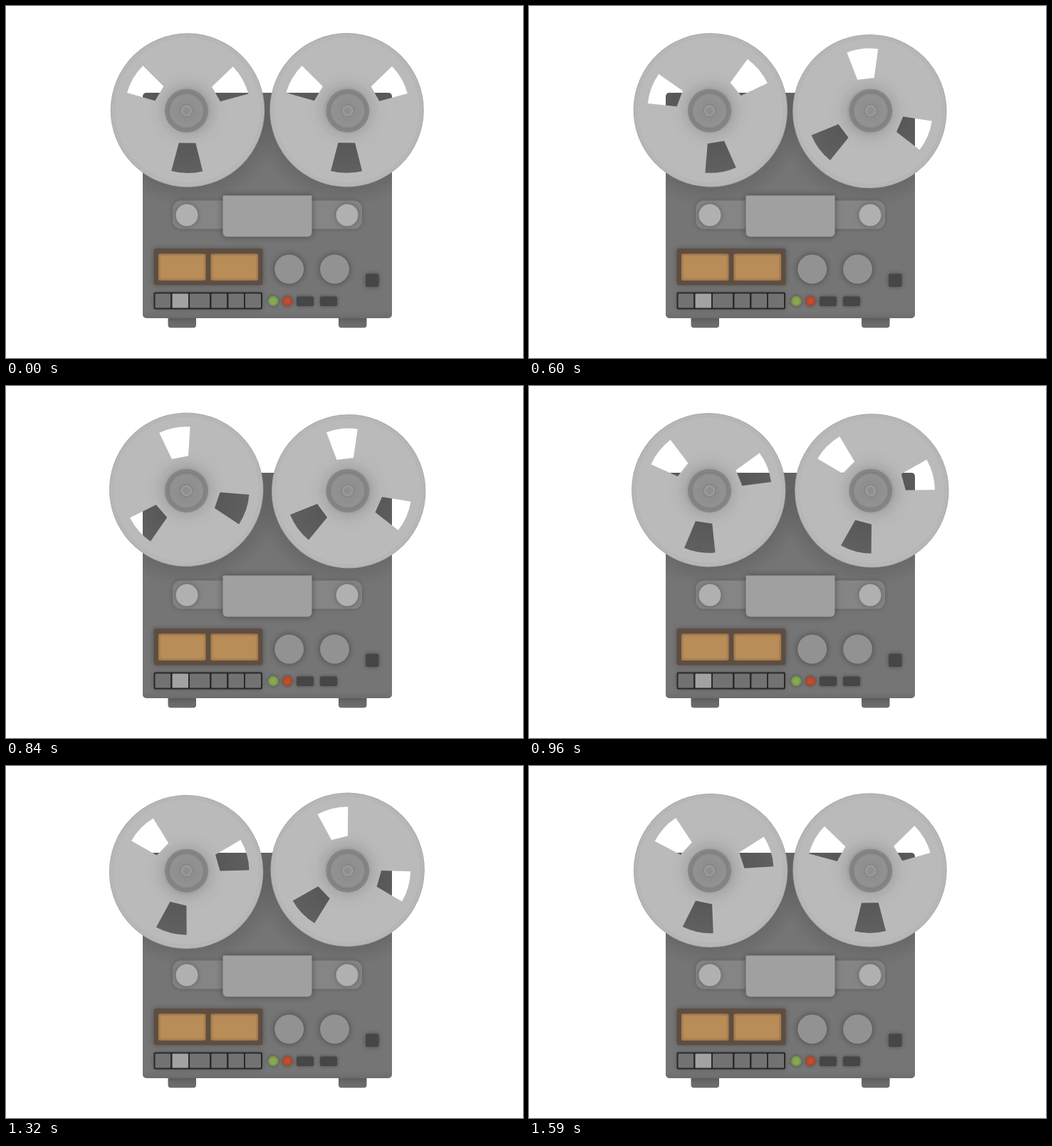
An HTML page with a canvas for the animation above (1.62 s loop, 726 px wide and 495 px high).

```html
<!DOCTYPE html>
<html lang="en">
<head>
<meta charset="utf-8">
<title>Tape recorder</title>
<style>
html, body { margin: 0; width: 100%; height: 100%; overflow: hidden; background: #fff; }
canvas { display: block; }
</style>
</head>
<body>
<canvas id="stage" width="726" height="495"></canvas>
<script>
const W = 726, H = 495, LOOP = 1620, STEP = 30;
const TAU = Math.PI * 2, RAD = Math.PI / 180;
const canvas = document.getElementById('stage');
const ctx = canvas.getContext('2d');

// Keys are [ms, degrees turned counter-clockwise].
const reels = [
  { x: 253.5, y: 147.3, wobble: 1.65, phase: -28, base: 90.5,
    keys: [[0, 0], [490, 0], [720, 33.3], [840, 71.5], [1080, 152.5], [1320, 226.5], [1590, 348.5]] },
  { x: 479.8, y: 147.3, wobble: 1.6, phase: 218, base: 90.3,
    keys: [[0, 0], [375, 0], [420, 2.8], [720, 127.2], [840, 186.5], [1080, 257.8], [1320, 314.3], [1590, 360.7]] }
];

function slopeAt(keys, i) {
  const slope = j => (keys[j + 1][1] - keys[j][1]) / (keys[j + 1][0] - keys[j][0]);
  if (i === 0) return slope(0);
  if (i === keys.length - 1) return slope(i - 1);
  const a = slope(i - 1), b = slope(i);
  return a * b > 0 ? 2 * a * b / (a + b) : 0;
}

// Monotone cubic interpolation
function turnAt(keys, t) {
  let i = 0;
  while (i < keys.length - 2 && t > keys[i + 1][0]) i++;
  const [t0, a] = keys[i], [t1, b] = keys[i + 1];
  const d = t1 - t0, u = (t - t0) / d, v = 1 - u;
  return a * (1 + 2 * u) * v * v + b * u * u * (3 - 2 * u)
    + d * u * v * (v * slopeAt(keys, i) - u * slopeAt(keys, i + 1));
}

function circle(c, x, y, r, fill) {
  c.beginPath();
  c.arc(x, y, r, 0, TAU);
  c.fillStyle = fill;
  c.fill();
}

function box(c, x0, y0, x1, y1, r, fill) {
  c.beginPath();
  c.roundRect(x0, y0, x1 - x0, y1 - y0, r);
  c.fillStyle = fill;
  c.fill();
}

function withShadow(c, blur, alpha, draw) {
  c.save();
  c.shadowBlur = blur;
  c.shadowColor = `rgba(0,0,0,${alpha})`;
  draw();
  c.restore();
}

function linear(c, y0, y1, ...stops) {
  const g = c.createLinearGradient(0, y0, 0, y1);
  stops.forEach(([p, color]) => g.addColorStop(p, color));
  return g;
}

function radial(c, x, y, r0, r1, ...stops) {
  const g = c.createRadialGradient(x, y, r0, x, y, r1);
  stops.forEach(([p, color]) => g.addColorStop(p, color));
  return g;
}

function drawBody(c) {
  const footFill = linear(c, 438, 453, [0, '#595959'], [0.5, '#696969'], [1, '#6d6d6d']);
  for (const x of [227.5, 467]) box(c, x, 434, x + 39.5, 452.5, 4, footFill);

  c.save();
  c.beginPath();
  c.roundRect(192, 122, 350, 317, 5);
  c.clip();
  c.fillStyle = linear(c, 122, 439, [0, '#737373'], [0.5, '#757575'], [0.97, '#757575'], [1, '#6c6c6c']);
  c.fillRect(192, 122, 350, 317);
  for (const { x, y } of reels) {
    circle(c, x, y, 135, radial(c, x, y, 35, 135,
      [0, 'rgba(0,0,0,.26)'], [0.5, 'rgba(0,0,0,.18)'], [0.72, 'rgba(0,0,0,.1)'], [1, 'rgba(0,0,0,0)']));
  }
  c.restore();
}

function drawTapePath(c) {
  withShadow(c, 6, 0.2, () => box(c, 234, 273.5, 500, 313.5, 12, '#858585'));
  for (const x of [254, 479]) {
    withShadow(c, 7, 0.3, () => circle(c, x, 294, 15.5, '#b0b0b0'));
  }
  withShadow(c, 10, 0.4, () => box(c, 304.5, 266.5, 429.5, 324.5, [1, 1, 6, 6], '#a0a0a0'));
}

function drawControls(c) {
  withShadow(c, 7, 0.3, () => box(c, 207.5, 341, 360.5, 392.5, 3, '#5e4e42'));
  for (const x of [214, 287.5]) {
    box(c, x, 348.5, x + 66.5, 386, 2, '#a47a4b');
    withShadow(c, 4, 0, () => {
      c.shadowColor = '#b98d58';
      box(c, x + 3, 351.5, x + 63.5, 383, 2, '#b98d58');
    });
  }

  withShadow(c, 6, 0.25, () => box(c, 207.5, 402.5, 360, 426.5, 2, '#292929'));
  const buttons = [[209.5, 231], [233.5, 256], [258, 286], [288.5, 310], [312.5, 334], [336, 358]];
  buttons.forEach(([x0, x1], i) =>
    box(c, x0, 404.5, x1, 424.5, 1, i === 1 ? '#a2a2a2' : '#727272'));

  for (const x of [397.7, 461.5]) {
    withShadow(c, 10, 0.4, () => circle(c, x, 370, 20.5, '#929292'));
  }
  for (const [x, color, core] of [[375.3, '#7c9a4b', '#88a856'], [395.3, '#ad472d', '#bd4c30']]) {
    withShadow(c, 5, 0.4, () => circle(c, x, 415, 7.2, color));
    circle(c, x, 415, 4.5, core);
  }
  for (const x of [408, 441]) {
    withShadow(c, 5, 0.35, () => box(c, x, 408.5, x + 24, 422, 2, '#464646'));
  }
  withShadow(c, 6, 0.35, () => box(c, 505, 376.5, 523.5, 395, 2, '#464646'));
}

function drawFlange(reel, t) {
  const turn = -turnAt(reel.keys, t);
  const angle = (reel.phase + turn) * RAD;
  ctx.save();
  ctx.translate(reel.x + reel.wobble * Math.cos(angle), reel.y + reel.wobble * Math.sin(angle));
  ctx.rotate((reel.base + turn) * RAD);

  ctx.beginPath();
  ctx.arc(0, 0, 108.2, 0, TAU);
  const half = 14.4 * RAD;
  for (let i = 0; i < 3; i++) {
    const mid = i * TAU / 3;
    ctx.moveTo(47.5 * Math.cos(mid - half), 47.5 * Math.sin(mid - half));
    ctx.arc(0, 0, 88.5, mid - half, mid + half);
    ctx.lineTo(47.5 * Math.cos(mid + half), 47.5 * Math.sin(mid + half));
    ctx.closePath();
  }
  ctx.fillStyle = radial(ctx, 0, 0, 28, 108.2,
    [0, '#9d9d9d'], [0.08, '#adadad'], [0.22, '#b7b7b7'], [0.4, '#bababa'],
    [0.92, '#bababa'], [0.935, '#b3b3b3'], [0.95, '#b8b8b8'], [0.98, '#b5b5b5'], [1, '#a6a6a6']);
  ctx.fill('evenodd');
  ctx.restore();
}

function drawHub({ x, y }) {
  circle(ctx, x, y, 30.5, '#858585');
  circle(ctx, x, y, 26.5, radial(ctx, x, y, 8, 26.5, [0, '#8d8d8d'], [0.75, '#929292'], [1, '#7b7b7b']));
  circle(ctx, x, y, 9.2, '#858585');
  circle(ctx, x, y, 7.8, '#9b9b9b');
  circle(ctx, x, y, 5.2, '#8f8f8f');
}

const deck = document.createElement('canvas');
deck.width = W;
deck.height = H;
const deckCtx = deck.getContext('2d');
drawBody(deckCtx);
drawTapePath(deckCtx);
drawControls(deckCtx);

function render(now) {
  const t = Math.floor((now % LOOP) / STEP) * STEP;
  ctx.fillStyle = '#fff';
  ctx.fillRect(0, 0, W, H);
  ctx.drawImage(deck, 0, 0);
  for (const reel of reels) {
    drawFlange(reel, t);
    drawHub(reel);
  }
}

const start = performance.now();
function tick() {
  render(performance.now() - start);
  requestAnimationFrame(tick);
}
tick();
</script>
</body>
</html>
```
